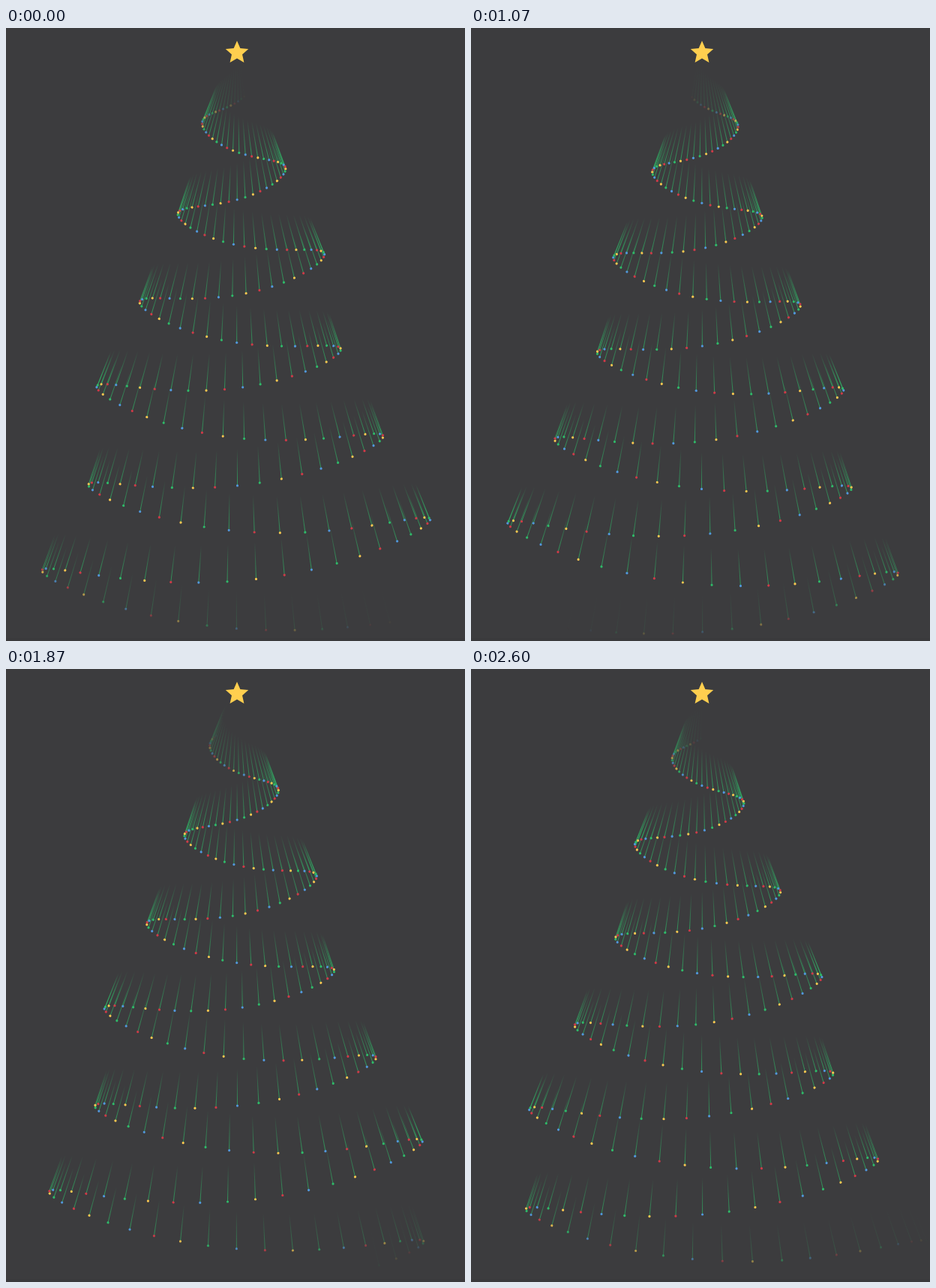
These frames come from a looping animation (612x817 px, 2670 ms). An HTML page with a canvas:

```html
<!DOCTYPE html>
<html lang="en">
<head>
<meta charset="utf-8">
<title>Tree of lights</title>
<style>
  html, body { margin: 0; width: 100%; height: 100%; overflow: hidden; background: #3c3c3e; }
  canvas { display: block; }
</style>
</head>
<body>
<canvas id="stage" width="612" height="817"></canvas>
<script>
const ctx = document.getElementById('stage').getContext('2d');

const LOOP = 2670;
const STEP = 66.45;
const LAST_STEP = 39;
// [step, seconds of motion]: the playback pace is slightly uneven
const PACE = [[0, 0], [9, 0.604], [16, 1.024], [19, 1.273], [25, 1.648], [32, 2.13], [39, 2.615]];

const APEX = { x: 308, y: 8.5 };
const SPEED = 190.5;          // px per second, away from the apex
const GAP = 2.977;            // px between two neighbouring lights
const START = 663.9;          // distance of light 0 at time 0
const CYCLE = 128;            // lights per full swing pattern
const NEAR = 82, FAR = 812, FADE = 63;
const TRAIL = 49;
const COLORS = ['#cf3a48', '#fbc851', '#2fba69', '#5297dc'];

const clamp = v => Math.max(0, Math.min(1, v));

const trailPaint = ctx.createLinearGradient(0, -TRAIL, 0, 0);
trailPaint.addColorStop(0, 'rgba(46, 190, 105, 0)');
trailPaint.addColorStop(1, 'rgba(46, 190, 105, 0.72)');

function motionTime(ms) {
  const step = Math.min(LAST_STEP, Math.floor((ms % LOOP) / STEP));
  let i = 1;
  while (PACE[i][0] < step) i++;
  const [s0, t0] = PACE[i - 1], [s1, t1] = PACE[i];
  return t0 + (t1 - t0) * (step - s0) / (s1 - s0);
}

function swing(n) {
  const phase = 2 * Math.PI * n / CYCLE;
  return (20 * Math.sin(3 * phase) + 2 * Math.cos(phase)) * Math.PI / 180;
}

function drawStar(x, y, outer, inner) {
  ctx.beginPath();
  for (let i = 0; i < 10; i++) {
    const r = i % 2 ? inner : outer;
    const a = i * Math.PI / 5;
    ctx.lineTo(x + r * Math.sin(a), y - r * Math.cos(a));
  }
  ctx.closePath();
  ctx.fillStyle = '#ffcf4f';
  ctx.fill();
}

function drawLight(n, distance) {
  ctx.save();
  ctx.globalAlpha = clamp((distance - NEAR) / FADE) * clamp((FAR - distance) / FADE);
  ctx.translate(APEX.x, APEX.y);
  ctx.rotate(-swing(n));
  ctx.translate(0, distance);
  ctx.fillStyle = trailPaint;
  ctx.fillRect(-0.5, -TRAIL, 1, TRAIL);
  ctx.fillStyle = COLORS[((n % 4) + 4) % 4];
  ctx.beginPath();
  ctx.arc(0, 0, 1.6, 0, 2 * Math.PI);
  ctx.fill();
  ctx.restore();
}

function draw(ms) {
  ctx.fillStyle = '#3c3c3e';
  ctx.fillRect(0, 0, 612, 817);
  ctx.fillStyle = '#3a3a3c';
  ctx.fillRect(0, 813, 612, 4);

  const base = START + SPEED * motionTime(ms);
  const first = Math.ceil((NEAR - base) / GAP);
  const last = Math.floor((FAR - base) / GAP);
  for (let n = last; n >= first; n--) drawLight(n, base + n * GAP);

  drawStar(308, 33, 16, 7.4);
}

let origin;
function tick(now) {
  origin ??= now;
  draw(now - origin);
  requestAnimationFrame(tick);
}
draw(0);
requestAnimationFrame(tick);
</script>
</body>
</html>
```
